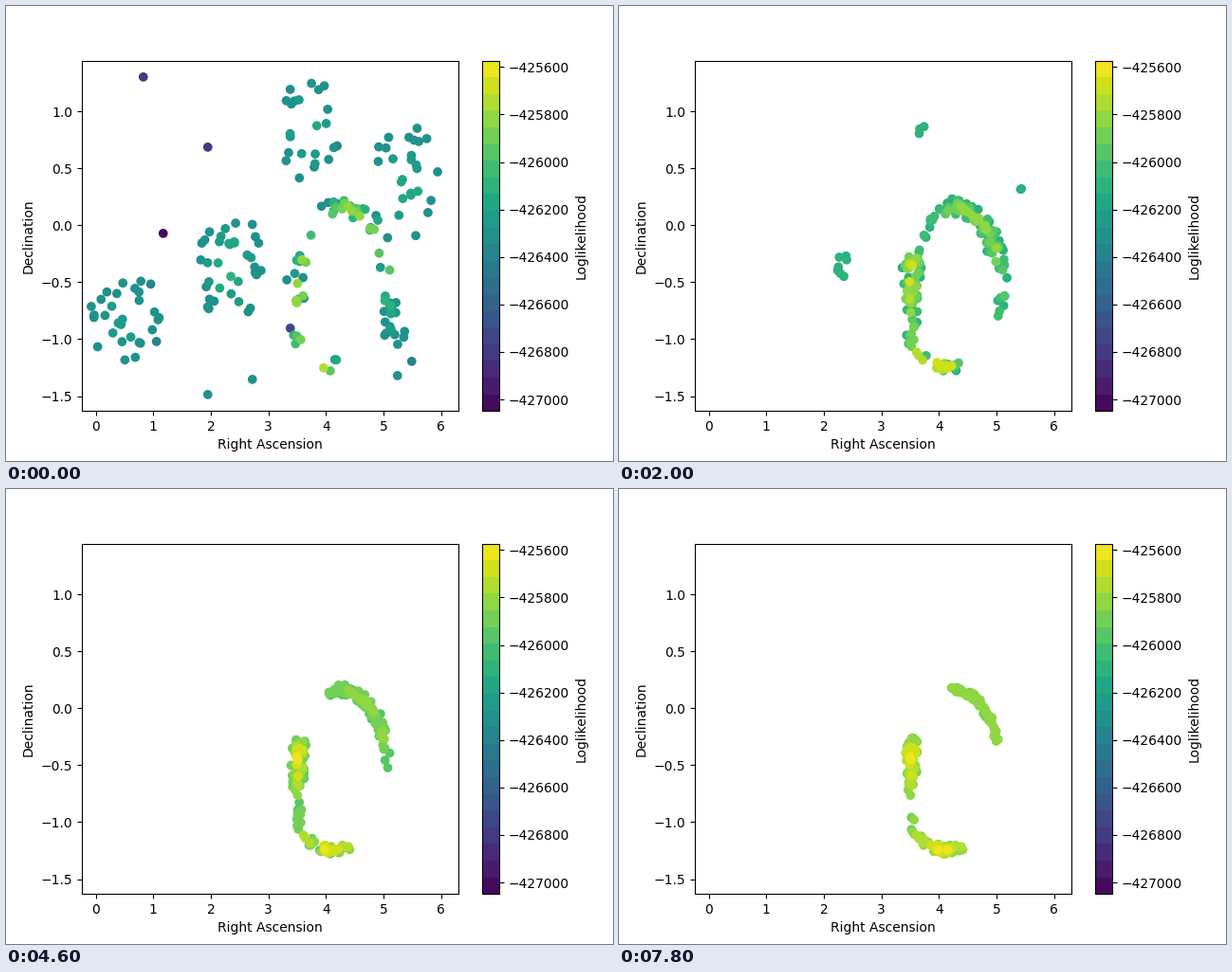
Animation, 640 px wide and 480 px high, one loop 8 s. Source, as a matplotlib script:

```python
"""Live points of a nested sampling run closing in on a ring in the sky."""
import numpy as np
import matplotlib.pyplot as plt
from matplotlib.animation import FuncAnimation
from matplotlib.colors import ListedColormap

FRAMES, INTERVAL = 40, 200
LIVE = 200
BASE = -426000                      # heights below are relative to this
VMIN, VMAX = -427048.6, -425573

# Frame of each stage and the lowest likelihood still alive there
STAGES = [0, 5, 10, 18, 23, 31, 39]
FLOORS = [-350, -230, -130, -80, 40, 120, 140]

# Closed ridge, in stage pixels: x, y, height, width, share of new points
RING = np.array([
    (308, 279, 427, 4.5, 22), (308, 315, 240, 4.5, 8),
    (309, 340, 140, 4, 3), (312, 362, 220, 4, 3),
    (323, 375, 320, 3, 3), (342, 381, 427, 3, 10),
    (360, 379, 260, 3, 3), (376, 377, 60, 3, 1),
    (402, 325, -60, 5, 3), (405, 303, 50, 4, 3),
    (400, 268, 160, 5, 6), (391, 241, 190, 5, 16),
    (376, 220, 190, 5, 16), (351, 210, 175, 5, 15),
    (327, 226, -20, 4, 3), (314, 256, 60, 5, 3),
])

# Side lobes: x, y, height, width, depth, points per unit of height
LOBES = [
    (125, 328, -200, 27, 32, 0.20),
    (235, 274, -70, 13, 22, 0.13),
    (320, 130, -90, 12, 22, 0.09),
    (422, 190, -110, 16, 28, 0.11),
    (410, 328, -180, 9, 18, 0.08),
]

# Lone points at the start: x, y, height
STRAYS = [
    (166, 240, -1048), (145, 75, -790), (213, 149, -780), (300, 340, -740),
    (213, 410, -290), (260, 394, -290), (413, 390, -290), (428, 375, -400),
]

rng = np.random.default_rng(7)


def spread(n, x, y, height, floor, wx, wy, power):
    """Fill the contour at floor evenly; power 1 is a cone, 2 a dome."""
    r, a = np.sqrt(rng.random(n)), rng.uniform(0, 2 * np.pi, n)
    gap = height - floor
    size = r * (gap / 100) ** (1 / power)
    return np.column_stack([x + wx * size * np.cos(a),
                            y + wy * size * np.sin(a),
                            floor + gap * (1 - r ** power)])


def on_ring(n, floor):
    t = np.linspace(0, len(RING), 1600, endpoint=False)
    x, y, height, width, share = (
        np.interp(t, np.arange(len(RING) + 1), np.append(col, col[0]))
        for col in RING.T)
    share = share * (height > floor)
    i = rng.choice(len(t), n, p=share / share.sum())
    return spread(n, x[i], y[i], height[i], floor, width[i], width[i], 2)


def fresh(n, floor, kinds):
    """New points above the floor: top up the lobes, the rest on the ring."""
    parts, tags = [], []
    for k, (x, y, height, wx, wy, rate) in enumerate(LOBES):
        want = int(rate * max(height - floor, 0)) - np.sum(kinds == k)
        want = int(np.clip(want, 0, n - len(tags)))
        if want:
            parts.append(spread(want, x, y, height, floor, wx, wy, 1))
            tags += [k] * want
    rest = n - len(tags)
    parts.append(on_ring(rest, floor))
    tags += [-1] * rest
    order = rng.permutation(n)
    return np.vstack(parts)[order], np.array(tags)[order]


def run():
    """Replace the weakest point by a better one, again and again."""
    pts, kinds = fresh(LIVE - len(STRAYS), FLOORS[0], np.array([]))
    pts = np.vstack([pts, STRAYS])
    kinds = np.append(kinds, [-1] * len(STRAYS))
    born, dies = np.zeros(LIVE, int), np.full(LIVE, FRAMES)
    for lo, hi, floor in zip(STAGES, STAGES[1:], FLOORS[1:]):
        alive = dies == FRAMES
        weak = np.flatnonzero(alive & (pts[:, 2] < floor))
        weak = weak[np.argsort(pts[weak, 2])]
        n = len(weak)
        when = lo + 1 + np.arange(n) * (hi - lo) // n
        dies[weak] = when
        new, tags = fresh(n, floor, kinds[dies == FRAMES])
        pts, kinds = np.vstack([pts, new]), np.append(kinds, tags)
        born = np.append(born, when)
        dies = np.append(dies, np.full(n, FRAMES))
    order = np.argsort(pts[:, 2])
    return pts[order], born[order], dies[order]


points, born, dies = run()
xy = np.column_stack([(points[:, 0] - 94.8) / 60.66,
                      (231.4 - points[:, 1]) / 120.2])
value = BASE + points[:, 2]

BANDS = 21
cmap = ListedColormap(plt.get_cmap("viridis")((np.arange(BANDS) + 0.5) / BANDS))

fig, ax = plt.subplots(figsize=(6.4, 4.8), dpi=100)
dots = ax.scatter([], [], c=[], cmap=cmap, vmin=VMIN, vmax=VMAX)
ax.set(xlim=(-0.240, 6.3014), ylim=(-1.630, 1.445),
       xlabel="Right Ascension", ylabel="Declination")
bar = fig.colorbar(dots, ax=ax, label="Loglikelihood")
bar.ax.ticklabel_format(axis="y", useOffset=False, style="plain")


def update(frame):
    live = (born <= frame) & (frame < dies)
    dots.set_offsets(xy[live])
    dots.set_array(value[live])
    return dots,


anim = FuncAnimation(fig, update, frames=FRAMES, interval=INTERVAL,
                     repeat=True, repeat_delay=0)
plt.show()
```
